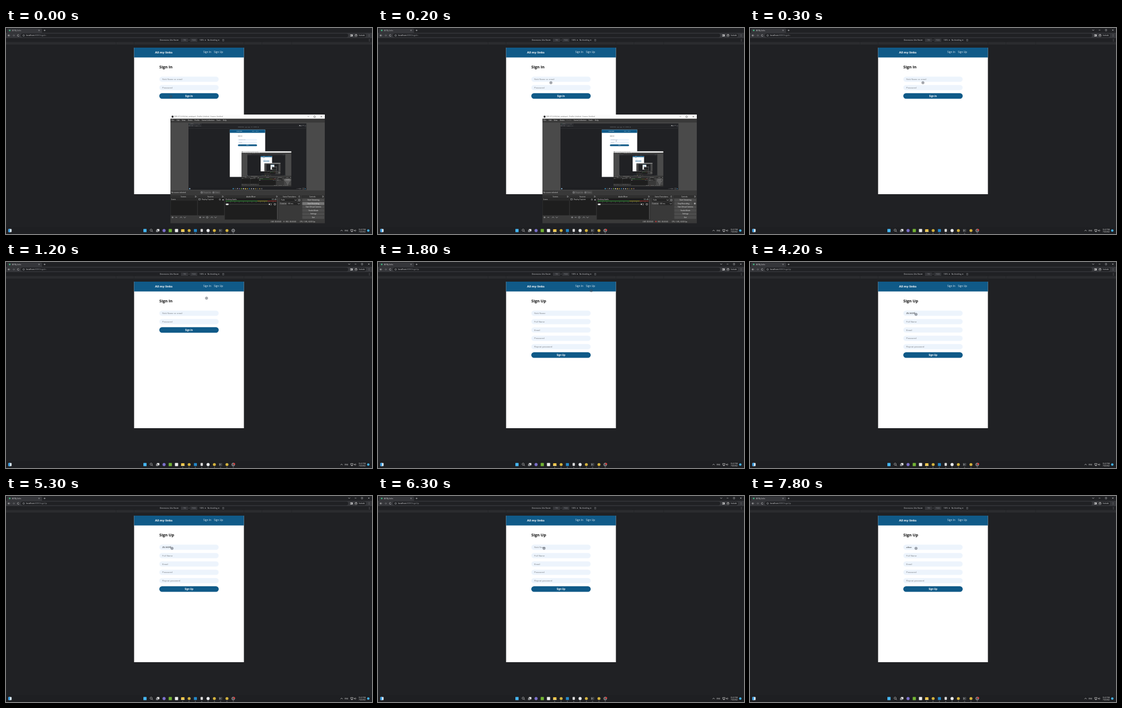
Write an HTML page with a canvas that moves like this. It is 690x388 px and loops after 8000 ms.

```html
<!DOCTYPE html>
<html lang="en">
<head>
<meta charset="utf-8">
<title>Sign up form</title>
<style>
  html, body { margin: 0; width: 100%; height: 100%; overflow: hidden; background: #202124; }
  canvas { display: block; width: 690px; height: 388px; }
</style>
</head>
<body>
<canvas id="stage"></canvas>
<script>
const LOOP = 8000, STEP = 100, W = 690, H = 388;
const BLUE = '#105a88', DARK = '#202124', GREY = '#b9bbbe';
const UI = '"Open Sans", sans-serif', FORM = '"Liberation Sans", sans-serif';

const canvas = document.getElementById('stage');
const ctx = canvas.getContext('2d');
const ratio = window.devicePixelRatio || 1;
canvas.width = W * ratio;
canvas.height = H * ratio;

// Pointer stops: time, x, y
const pointerPath = [[0, 311, 129], [200, 326, 103], [400, 326, 103], [800, 334, 94], [900, 334, 94],
  [1400, 402, 54], [1800, 402, 54], [2500, 313, 98.6]];
// Nick name field: time, value, caret visible
const typing = [[0, '', 0], [3400, 'Z', 1], [3500, 'ZI', 1], [3700, 'ZIL', 1], [4000, 'ZILN', 1],
  [4100, 'ZILNO', 1], [4200, 'ZILNOR', 1], [4800, 'ZILNOR', 0], [5300, 'ZILNOR', 1], [5400, 'ZILNO', 1],
  [5900, 'ZI', 1], [6000, '', 1], [6300, '', 0], [6600, 'z', 1], [6800, 'zi', 1], [6900, 'zil', 1],
  [7100, 'ziln', 1], [7200, 'zilno', 1], [7300, 'zilnor', 1], [7800, 'zilnor', 0]];

function rect(x, y, w, h, color, radius = 0) {
  ctx.fillStyle = color;
  ctx.beginPath();
  ctx.roundRect(x, y, w, h, radius);
  ctx.fill();
}

function circle(x, y, r, color) {
  ctx.fillStyle = color;
  ctx.beginPath();
  ctx.arc(x, y, r, 0, 7);
  ctx.fill();
}

function ring(x, y, r, color = GREY, start = 0, end = 7) {
  ctx.strokeStyle = color;
  ctx.lineWidth = .6;
  ctx.beginPath();
  ctx.arc(x, y, r, start, end);
  ctx.stroke();
}

function line(color, ...points) {
  ctx.strokeStyle = color;
  ctx.lineWidth = .7;
  ctx.beginPath();
  points.forEach(([x, y]) => ctx.lineTo(x, y));
  ctx.stroke();
}

function box(x, y, w, h, color = GREY) {
  ctx.strokeStyle = color;
  ctx.lineWidth = .6;
  ctx.strokeRect(x, y, w, h);
}

// y is the middle of the capitals
function text(value, x, y, size, color, { weight = 400, align = 'left', font = UI } = {}) {
  ctx.font = `${weight} ${size}px ${font}`;
  ctx.textAlign = align;
  ctx.textBaseline = 'alphabetic';
  ctx.fillStyle = color;
  ctx.fillText(value, x, y + size * .36);
}

function cross(x, y, r, color = GREY) {
  line(color, [x - r, y - r], [x + r, y + r]);
  line(color, [x - r, y + r], [x + r, y - r]);
}

function plus(x, y, r = 1.7, color = GREY) {
  line(color, [x - r, y], [x + r, y]);
  line(color, [x, y - r], [x, y + r]);
}

function chevron(x, y, dir, color = GREY) {
  line(color, [x - 2, y - dir], [x, y + dir], [x + 2, y - dir]);
}

function dropArrow(x, y, color = GREY) {
  ctx.fillStyle = color;
  ctx.beginPath();
  ctx.moveTo(x - 1.2, y - .7);
  ctx.lineTo(x + 1.2, y - .7);
  ctx.lineTo(x, y + .9);
  ctx.fill();
}

function kebab(x, y) {
  [-1.7, 0, 1.7].forEach(d => circle(x, y + d, .45, GREY));
}

function drawBrowser(state) {
  rect(0, 0, W, H, DARK);
  rect(2, 1, 66, 9, '#35363a', 2);
  rect(0, 9, W, 10, '#35363a');
  circle(7, 4.6, 1.5, '#42b883');
  text('All My Links', 11.5, 4.6, 3.1, state.active ? '#e3e4e6' : '#c2c4c7');
  cross(62.3, 4.5, 1.1);
  plus(72.8, 4.5, 1.6);
  if (state.active) {
    chevron(647, 4, .8);
    line(GREY, [657.5, 4], [660.5, 4]);
    box(670, 2.7, 2.6, 2.6);
    cross(684, 4, 1.3);
  }

  line('#dddddd', [7.5, 14], [3.8, 14]);
  line('#dddddd', [5.7, 12.2], [3.8, 14], [5.7, 15.8]);
  line('#77797d', [12.5, 14], [16.2, 14]);
  line('#77797d', [14.4, 12.2], [16.2, 14], [14.4, 15.8]);
  ring(23.2, 14, 1.7, '#dddddd', .3, 5.5);
  rect(28, 10.6, 617, 6.8, DARK, 3.4);
  ring(33.3, 14, 1.5);
  text('localhost', 38, 14, 3.8, '#ececee');
  text(':8080/' + (state.signUp ? 'signUp' : 'signIn'), 54, 14, 3.8, '#94979b');
  box(649.5, 12.3, 3.5, 3.4, '#e8e8e8');
  rect(651.4, 12.3, 1.7, 3.4, '#e8e8e8');
  rect(657, 10.7, 22, 6.7, DARK, 3.3);
  ring(660, 14, 2.2, '#e8e8e8');
  circle(660, 13.4, .8, '#e8e8e8');
  text('Invitado', 665, 14, 3, '#e1e2e4');
  kebab(684.5, 14);

  text('Dimensions: Zelu Pane', 290, 23, 3.1, '#d5d7da');
  dropArrow(324, 23);
  rect(330, 20, 13, 6, '#35363a');
  text('768', 336.5, 23, 3, '#85888c', { align: 'center' });
  text('×', 345.2, 23, 3.2, GREY, { align: 'center' });
  rect(347.5, 20, 13, 6, '#35363a');
  text('1024', 354, 23, 3, '#85888c', { align: 'center' });
  text('100%', 365, 23, 3.1, '#d5d7da');
  dropArrow(375.8, 23);
  text('No throttling', 380, 23, 3.1, '#d5d7da');
  dropArrow(401, 23);
  box(408.5, 21.5, 2.3, 3, '#7b7d81');
  kebab(685, 23);
  rect(0, 26.5, W, 4.8, '#2b2c2f');
  [207, 241.5, 448.5, 482, 538].forEach(x => rect(x, 26.5, .5, 4.8, '#1d1e20'));
}

function drawField(label, y, value = '', caret = false) {
  rect(288.8, y - 5.2, 112.4, 10.4, '#f5f9fe', 5.2);
  rect(289.6, y - 4.5, 110.8, 9, '#edf4fc', 4.5);
  text(value || label, 294.5, y, 4.35, value ? '#24282d' : '#7b8087', { font: FORM });
  if (caret) rect(294.5 + (value ? ctx.measureText(value).width : 0), y - 2.3, .4, 4.3, '#333333');
}

function drawPage(state) {
  rect(241.5, 37, 207, 276, '#ffffff');
  rect(241.5, 37, 207, 18.6, BLUE);
  text('All my links', 281, 45.5, 5.7, '#ffffff', { weight: 700 });
  text('Sign In', 372, 45.4, 4.8, '#e9f0f5');
  text('Sign Up', 392, 45.4, 4.8, '#e9f0f5');

  const title = state.signUp ? 'Sign Up' : 'Sign In';
  const labels = state.signUp
    ? ['Nick Name', 'Full Name', 'Email', 'Password', 'Repeat password']
    : ['Nick Name or email', 'Password'];
  text(title, 289, 73.6, 7.5, '#0b0b0b', { weight: 700 });
  labels.forEach((label, i) => i === 0
    ? drawField(label, 96.5, state.value, state.caret)
    : drawField(label, 96.5 + i * 15.75, ''));
  const y = 96.5 + labels.length * 15.75;
  rect(289, y - 5.2, 112, 10.4, BLUE, 5.2);
  text(title, 345, y, 4.35, '#ffffff', { weight: 700, align: 'center' });
}

function drawTaskbar(state) {
  const y = 381.5;
  rect(0, 375, W, 13, '#1e1f22');
  rect(4.5, y - 3, 6, 6, '#e6f2fb', 1);
  rect(4.5, y - 3, 3, 6, '#2d9be8', 1);
  rect(259, y - 3, 6, 6, '#45b5f0', .5);
  ring(273.6, y - .7, 2, '#eeeeee');
  line('#eeeeee', [275, y + .7], [276.8, y + 2.6]);
  rect(284.5, y - 2.8, 4.6, 4.2, '#f0f0f0');
  rect(282.8, y - 1, 4.4, 3.8, '#8b8d90');
  circle(298, y, 2.9, '#7b70c9');
  rect(306.7, y - 3, 6, 6, '#72b334', .6);
  rect(318.5, y - 3, 6, 6, '#eeeeee', .8);
  rect(330.2, y - 2.6, 6.2, 5.2, '#f3c443', .6);
  rect(330.2, y + .8, 6.2, 1.8, '#f8dc83');
  [345.3, 392.8, 416.6].forEach(x => circle(x, y, 2.8, '#d2b13e'));
  rect(354.3, y - 2.8, 5.6, 5.6, '#2489ca', .5);
  rect(366.8, y - 3, 4.4, 5.6, '#d9d9d9', 1);
  circle(381, y, 2.9, '#eceef0');
  rect(401.5, y - 2.7, 6, 5.2, '#45484b', .5);
  line('#ffffff', [402.5, y - 1.4], [404, y], [402.5, y + 1.4]);
  circle(428.4, y, 2.9, '#55575b');
  ring(428.4, y, 2.8, '#d8d8d8');
  if (state.recording) circle(430.2, y - 1.2, 1.7, '#e13c3c');
  [333, 345, 357, 369, 381, 393, 404.5, 416.5, 428.5].forEach(x => rect(x - 1, 386, 2, .7, '#8c9298', .3));

  chevron(632.7, y, -.8, '#e5e5e5');
  text('ENG', 638.5, y, 3.2, '#eeeeee');
  box(650, y - 1.9, 4, 3, '#e5e5e5');
  line('#e5e5e5', [650.8, y + 2.2], [653.4, y + 2.2]);
  rect(656.4, y - .8, 1.6, 1.6, '#e5e5e5');
  ring(657.8, y, 1.8, '#e5e5e5', -1.2, 1.2);
  text('10:21 PM', 678, 379.4, 3.1, '#eeeeee', { align: 'right' });
  text('7/4/2022', 678, 383.7, 3.1, '#eeeeee', { align: 'right' });
  circle(683, y, 2.3, '#43b1ea');
}

function drawRecorder(state, depth) {
  const label = (value, x, y, color = '#dddddd', align = 'left') => text(value, x, y, 3.1, color, { align });
  rect(310, 163, 291, 204.7, '#393939');
  rect(310, 163, 291, 7.7, '#fcfcfc');
  circle(314, 167, 1.9, '#26262a');
  label('OBS 27.2.4 (64-bit, windows) - Profile: Untitled - Scenes: Untitled', 317, 167, '#666666');
  line('#888888', [568.5, 167], [571.5, 167]);
  box(580.6, 165.7, 2.6, 2.6, '#555555');
  cross(594.5, 167, 1.3, '#444444');
  [['File', 312], ['Edit', 322], ['View', 331.5], ['Docks', 343], ['Profile', 355.5],
    ['Scene Collection', 369], ['Tools', 397], ['Help', 409]].forEach(([name, x]) =>
    label(name, x, 174.2, name === 'Profile' && state.recording ? '#6c6c6c' : '#e2e2e2'));

  rect(310, 178, 291, 128, '#4a4a4a');
  ctx.save();
  ctx.translate(344, 179.6);
  ctx.scale(.3225, .3225);
  ctx.beginPath();
  ctx.rect(0, 0, W, H);
  ctx.clip();
  if (depth > 0) drawScreen(state, depth - 1);
  else rect(0, 0, W, H, DARK);
  ctx.restore();

  label('No source selected', 311.5, 309.7);
  rect(366, 306.5, 21, 6.3, '#474747', 1);
  ring(369, 309.7, 1.4);
  label('Properties', 372, 309.7, '#858585');
  rect(388, 306.5, 16, 6.3, '#474747', 1);
  ring(391, 309.7, 1.2);
  label('Filters', 393.5, 309.7, '#858585');

  [['Scenes', 310.5, 50], ['Sources', 361.5, 50], ['Audio Mixer', 412.5, 101],
    ['Scene Transitions', 514.5, 41.5], ['Controls', 557, 43.5]].forEach(([name, x, w], i) => {
    rect(x, 315, w, 5.3, '#2f2f2f');
    label(name, x + w / 2 - 1, 317.7, '#e5e5e5', 'center');
    box(x + w - 4, 316.7, 1.8, 1.8);
    if (i < 3) rect(x, 320.3, w, i < 2 ? 32.5 : 40.5, '#1e1e1e');
  });
  rect(310.5, 320.5, 50, 5, '#292929');
  label('Scene', 311.5, 323);
  box(363.2, 321.6, 3.4, 2.4);
  label('Display Capture', 368.8, 323);
  ring(403.2, 323, 1.3);
  rect(408, 322.6, 2.4, 2, GREY);
  [[314, 321, 330, 337], [366, 372.5, 388, 395]].forEach(([add, remove, up, down]) => {
    plus(add, 356.7);
    line(GREY, [remove - 1.7, 356.7], [remove + 1.7, 356.7]);
    chevron(up, 356.7, -1);
    chevron(down, 356.7, 1);
  });
  ring(379.4, 356.7, 1.5);

  label('Desktop Audio', 414, 323);
  label('0.0 dB', 510, 323, '#dddddd', 'right');
  rect(414, 325.3, 60, 1.3, '#2f8a34');
  rect(474, 325.3, 19, 1.3, '#8f8a2c');
  rect(493, 325.3, 17, 1.3, '#98302c');
  for (let x = 415; x < 511; x += 8) rect(x, 327.3, .6, 1.2, '#7d7d7d');
  rect(414, 331.7, 80, .8, '#4d4d4d');
  rect(414.5, 330.8, 5, 2.6, '#eeeeee', .7);
  rect(495.5, 330.8, 2, 2.4, '#eeeeee');
  ring(498, 332, 2.3, '#eeeeee', -1.1, 1.1);
  ring(506.8, 332, 1.6, '#eeeeee');
  rect(510.8, 320.5, 2.2, 40, '#444444');

  rect(516.5, 321.3, 32.5, 5.6, '#242424', .7);
  label('Fade', 518.5, 324.1);
  chevron(546, 324.1, .7);
  ring(553, 324.1, 1.6);
  label('Duration', 516.5, 330.8);
  rect(529.5, 328, 25, 5.6, '#242424', .7);
  label('300 ms', 531, 330.8);
  chevron(552, 330.8, .7);

  ['Start Streaming', state.recording ? 'Stop Recording' : 'Start Recording', 'Start Virtual Camera',
    'Studio Mode', 'Settings', 'Exit'].forEach((name, i) => {
    const y = 324.2 + i * 6.5;
    const paused = i === 1 && state.recording;
    rect(558.5, y - 2.8, paused ? 35 : 41.5, 5.6, i === 1 && !state.recording ? '#777777' : '#4c4c4c', .8);
    label(name, paused ? 576 : 579.5, y, '#e8e8e8', 'center');
    if (paused) {
      rect(594.3, y - 2.8, 5.7, 5.6, '#4c4c4c', .8);
      rect(596, y - 1.4, .8, 2.8, '#eeeeee');
      rect(597.7, y - 1.4, .8, 2.8, '#eeeeee');
    }
  });
  label('LIVE: 00:00:00', 519, 364.4, '#dddddd', 'right');
  circle(524, 364.4, 1.2, state.recording ? '#d33a3a' : '#777777');
  label('REC: 00:00:00', 547, 364.4, '#dddddd', 'right');
  label('CPU: 1.8%, 60.00 fps', 583, 364.4, '#dddddd', 'right');
}

function drawPointer([x, y]) {
  circle(x, y, 2.6, 'rgba(75, 82, 92, .38)');
  ring(x, y, 2.4, 'rgba(55, 60, 70, .5)');
  circle(x, y, .9, 'rgba(50, 55, 65, .35)');
}

function drawScreen(state, depth) {
  drawBrowser(state);
  drawPage(state);
  drawTaskbar(state);
  if (!state.active) drawRecorder(state, depth);
  drawPointer(state.pointer);
}

function pointerAt(t) {
  const next = pointerPath.findIndex(stop => stop[0] > t);
  if (next < 0) return pointerPath.at(-1).slice(1);
  const [t0, x0, y0] = pointerPath[next - 1];
  const [t1, x1, y1] = pointerPath[next];
  const p = (t - t0) / (t1 - t0);
  const eased = p * p * (3 - 2 * p);
  return [x0 + (x1 - x0) * eased, y0 + (y1 - y0) * eased];
}

function frame(now) {
  const t = Math.floor(now % LOOP / STEP) * STEP;
  const [, value, caret] = typing.findLast(entry => entry[0] <= t);
  ctx.setTransform(ratio, 0, 0, ratio, 0, 0);
  drawScreen({
    value, caret,
    recording: t >= 100,
    active: t >= 300,
    signUp: t >= 1800,
    pointer: pointerAt(t)
  }, 3);
  requestAnimationFrame(frame);
}
requestAnimationFrame(frame);
</script>
</body>
</html>
```
